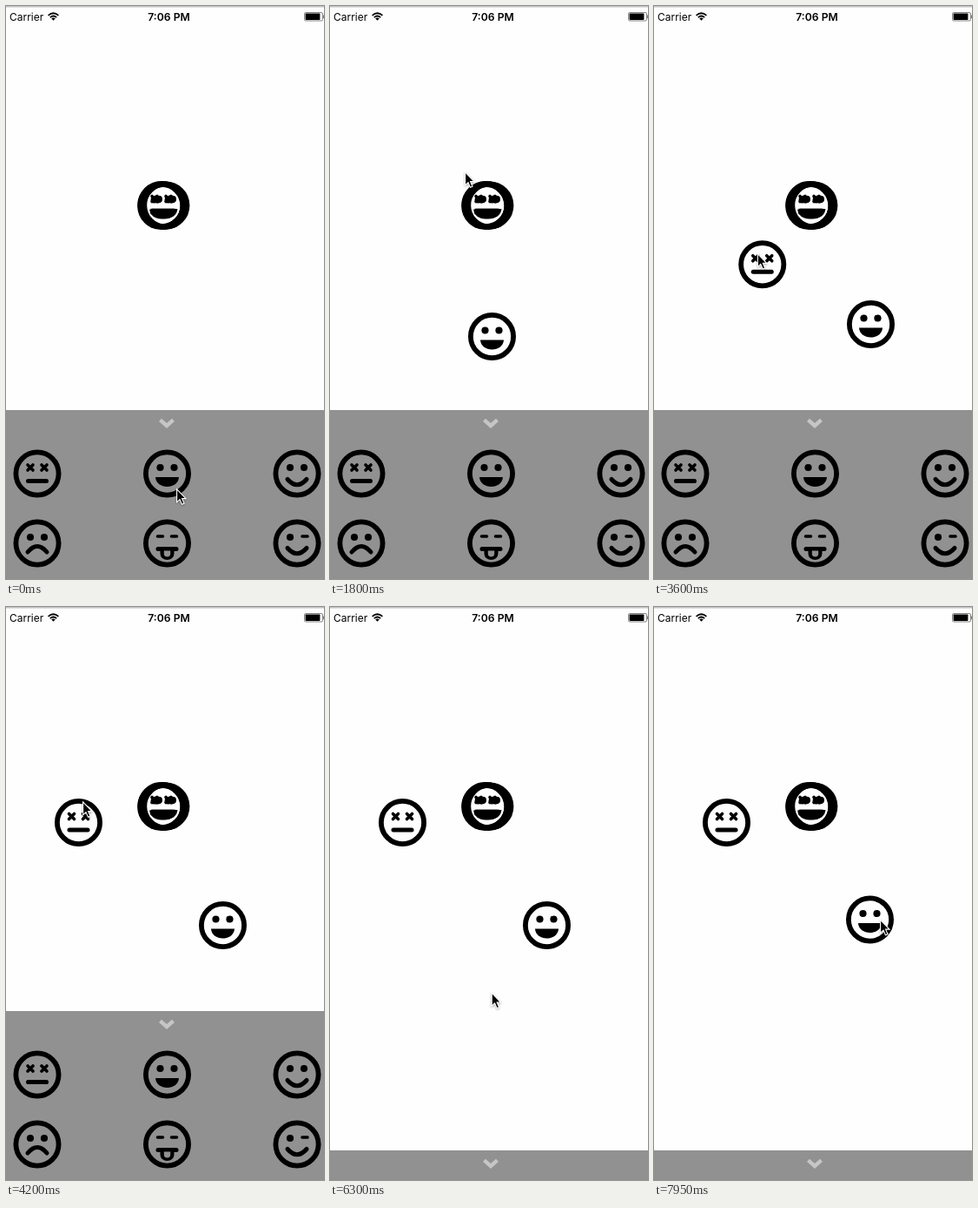
Write an HTML page that moves like this. It is 366 by 658 pixels and loops after 8000 ms.

```html
<!DOCTYPE html>
<html lang="en">
<head>
<meta charset="utf-8">
<title>Face tray</title>
<style>
  html, body { margin: 0; width: 100%; height: 100%; overflow: hidden; background: #fefefe; }
  svg { display: block; width: 366px; height: 658px; }
  text { font: 12px Inter, Roboto, sans-serif; }
  .line { fill: none; stroke: #000; stroke-width: 5; stroke-linecap: round; }
  .thin { stroke-width: 3.6; }
</style>
</head>
<body>
<svg viewBox="0 0 366 658">
  <defs>
    <circle id="ring" r="24.6" fill="none" stroke="#000" stroke-width="5.8"/>
    <circle id="eye" cy="-7" r="4.1"/>
    <g id="eyes"><use href="#eye" x="-8"/><use href="#eye" x="8"/></g>
    <path id="cross" class="line thin" d="M-3-3 3 3M3-3-3 3"/>
    <path id="curve" class="line" d="M-11 6.5Q0 19 11 6.5"/>
    <path id="bar" class="line" d="M-10.5 8.5H10.5"/>
    <g id="laugh">
      <use href="#ring"/><use href="#eyes"/>
      <path d="M-13.5 4H13.5C13 11 7 15 0 15S-13 11-13.5 4Z"/>
    </g>
    <g id="dead">
      <use href="#ring"/><use href="#cross" x="-8" y="-7"/><use href="#cross" x="8" y="-7"/>
      <use href="#bar"/>
    </g>
    <g id="smile"><use href="#ring"/><use href="#eyes"/><use href="#curve"/></g>
    <g id="sad">
      <use href="#ring"/><use href="#eyes"/>
      <path class="line" d="M-11 10Q0-3 11 10"/>
    </g>
    <g id="tongue">
      <use href="#ring"/><use href="#bar" y="-2"/>
      <path class="line thin" d="M-11-8H-5M5-8H11"/>
      <path d="M-8 6H8V12A8 7 0 0 1-8 12Z"/>
      <path fill="#919191" d="M-3.7 8.5H3.7V12A3.7 3.5 0 0 1-3.7 12Z"/>
    </g>
    <g id="wink">
      <use href="#ring"/><use href="#eye" x="-8"/><use href="#curve" y="-1"/>
      <path class="line thin" d="M6-8H12"/>
    </g>
  </defs>

  <rect width="366" height="658" fill="#fefefe"/>
  <rect width="366" height="1.5" fill="#c4c4c4"/>
  <text x="4" y="16.6">Carrier</text>
  <text x="187.5" y="16.6" text-anchor="middle" style="font-weight:600;font-size:12.2px">7:06 PM</text>
  <g fill="none" stroke="#000" stroke-width="1.7">
    <path d="M48.6 10.9Q54.5 5.6 60.4 10.9M50.8 13.1Q54.5 9.9 58.2 13.1"/>
    <path fill="#000" stroke="none" d="M52.2 14.3Q54.5 12.6 56.8 14.3L54.5 16.8Z"/>
  </g>
  <rect x="343.5" y="7.5" width="21" height="9.5" rx="1.5" fill="none" stroke="#666" stroke-width=".8"/>
  <rect x="344.6" y="8.6" width="16.8" height="7.3" rx=".6"/>
  <rect x="365.2" y="10.5" width="1" height="3.6" fill="#666"/>

  <g id="pile"></g>
  <g id="tray">
    <rect y="464" width="366" height="194" fill="#919191"/>
    <path d="M177.5 475.3 185 482 192.5 475.3" fill="none" stroke="#c6c6c6" stroke-width="4.4"/>
  </g>
  <g id="loose"></g>
  <path id="cursor" d="M.6-.2V14.8L4 11.6 6.5 17.3 9 16.2 6.6 10.6H11Z"
    stroke="#fff" stroke-width="1.1" style="filter:drop-shadow(0 1px 1px #0005)"/>
</svg>
<script>
  const LOOP = 8000, TICK = 150;

  // Pointer stops: [arrival time, x, y, face dragged on the way here]
  const stops = [
    [150, 196, 555], [600, 186, 546],
    [1050, 136, 330, 'laugh'], [1350, 187, 388.5, 'laugh'],
    [1800, 155, 191], [2100, 190, 385], [2400, 253, 371, 'laugh'],
    [2700, 91, 544], [3000, 30, 525],
    [3450, 123, 224, 'dead'], [3750, 114.5, 345.5, 'dead'], [4050, 77.5, 235.5, 'dead'],
    [4200, 88, 224], [4800, 60, 261], [5250, 160, 551], [5550, 177, 488],
    [6000, 183, 476], [6450, 186.5, 432], [6750, 190, 360], [7200, 129, 481],
    [7650, 261, 366], [7950, 260, 359.5, 'laugh']
  ];

  const el = id => document.getElementById(id);
  const place = (node, x, y) => node.setAttribute('transform', `translate(${x} ${y})`);
  const progress = (t, from, to) => Math.min(1, Math.max(0, (t - from) / (to - from)));
  const smooth = k => k * k * (3 - 2 * k);

  function addFace(parent, kind, x, y) {
    const face = document.createElementNS('http://www.w3.org/2000/svg', 'use');
    face.setAttribute('href', '#' + kind);
    place(face, x, y);
    return el(parent).appendChild(face);
  }

  const home = {};
  ['dead', 'laugh', 'smile', 'sad', 'tongue', 'wink'].forEach((kind, i) => {
    home[kind] = [36 + 149.5 * (i % 3), 537 + 80 * Math.floor(i / 3)];
    addFace('tray', kind, ...home[kind]);
  });

  addFace('pile', 'dead', 179, 228.5);
  for (let i = 0; i < 5; i++) addFace('pile', 'laugh', 178.7 + 1.3 * i, 229 + .5 * Math.cos(2 * i));

  const loose = ['laugh', 'dead'].map(kind => ({ kind, node: addFace('loose', kind, ...home[kind]) }));

  // Adds up the pointer's moves, or only those that drag the given face.
  function travel(t, [x, y], kind) {
    for (let i = 1; i < stops.length; i++) {
      const [from, x0, y0] = stops[i - 1];
      const [to, x1, y1, held] = stops[i];
      if (kind && held !== kind) continue;
      const k = smooth(progress(t, from, to));
      x += (x1 - x0) * k;
      y += (y1 - y0) * k;
    }
    return [x, y];
  }

  function draw(t) {
    place(el('cursor'), ...travel(t, stops[0].slice(1, 3)));
    place(el('tray'), 0, 160 * Math.sin(progress(t, 6000, 6300) * Math.PI / 2));
    for (const { kind, node } of loose) {
      const [x, y] = travel(t, home[kind], kind);
      node.style.display = y === home[kind][1] ? 'none' : '';
      place(node, x, y);
    }
  }

  const start = performance.now();
  function frame() {
    const time = (performance.now() - start) % LOOP;
    draw(Math.floor(time / TICK) * TICK);
    requestAnimationFrame(frame);
  }
  frame();
</script>
</body>
</html>
```
